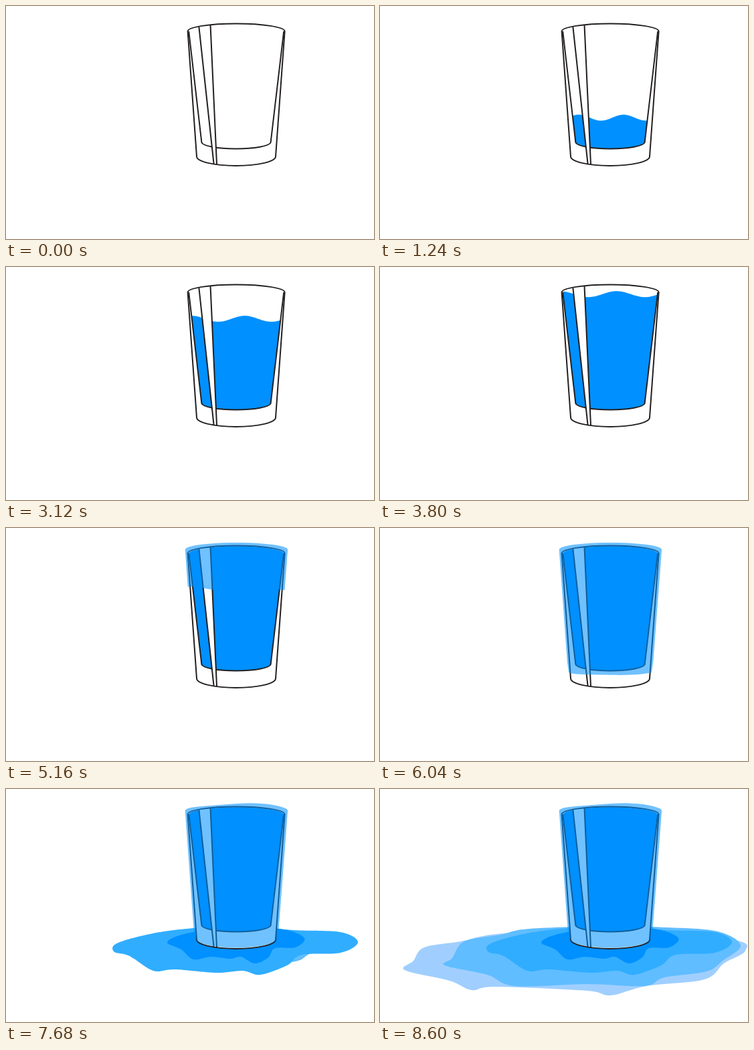
An HTML page with a canvas that plays this animation: 550x350 px, repeating every 9.28 s.

```html
<!DOCTYPE html>
<html lang="en">
<head>
<meta charset="utf-8">
<title>Overflowing glass</title>
<style>
  html, body { margin: 0; width: 100%; height: 100%; overflow: hidden; background: #fff; }
  canvas { display: block; width: 550px; height: 350px; }
</style>
</head>
<body>
<canvas id="stage"></canvas>
<script>
const LOOP = 9280, STEP = 40, END = 8600;
const BLUE = '#0090ff', INK = '#231f20';
const canvas = document.getElementById('stage');
const ctx = canvas.getContext('2d');
const ratio = window.devicePixelRatio || 1;
canvas.width = 550 * ratio;
canvas.height = 350 * ratio;
ctx.scale(ratio, ratio);

const { PI, sin, cos, min, max } = Math;
const progress = (t, from, to) => max(0, min(1, (t - from) / (to - from)));

function fill(path, color) {
  ctx.fillStyle = color;
  ctx.fill(path);
}

function polygon(points) {
  const path = new Path2D();
  points.forEach(p => path.lineTo(...p));
  path.closePath();
  return path;
}

// Closed Catmull-Rom curve
function blob(points) {
  const path = new Path2D(), n = points.length;
  path.moveTo(...points[0]);
  points.forEach((b, i) => {
    const a = points[(i + n - 1) % n], c = points[(i + 1) % n], d = points[(i + 2) % n];
    path.bezierCurveTo(
      b[0] + (c[0] - a[0]) / 6, b[1] + (c[1] - a[1]) / 6,
      c[0] - (d[0] - b[0]) / 6, c[1] - (d[1] - b[1]) / 6, c[0], c[1]);
  });
  return path;
}

// Glass
const outer = new Path2D('M271.6 38A72.5 11.5 0 0 1 416.6 38L403 226A59 14 0 0 1 285 226Z');
const inner = new Path2D('M273.4 38A71 11.5 0 0 1 415 38L395.6 205A51.7 10 0 0 1 292.4 205Z');
const innerLine = new Path2D('M273.2 38L292.4 205A51.7 10 0 0 0 395.6 205L415.2 38');
const strip = new Path2D('M288.3 30.6L310.6 237.4L315 238L305.5 28.4Z');
const stripLine = new Path2D('M288.3 30.6L310.6 237.4M305.5 28.4L315 238');

// Puddles from back to front, each a few corners of its outline
const puddles = [
  { color: '#a0cfff', from: 8040, to: 8600, y: 240, corners: [
    [345, 208], [182, 217], [120, 229], [66, 238], [50, 258], [37, 272], [104, 288], [137, 302], [173, 297],
    [309, 303], [345, 310], [398, 296], [485, 286], [514, 262], [546, 243], [525, 226]] },
  { color: '#60bdff', from: 7520, to: 8140, y: 240, corners: [
    [345, 206], [223, 210], [180, 219], [126, 229], [108, 254], [97, 265], [160, 279], [202, 296], [310, 293],
    [395, 296], [425, 283], [488, 274], [512, 258], [539, 235], [505, 214], [430, 208]] },
  { color: '#30adff', from: 7120, to: 7640, y: 240, corners: [
    [345, 206], [243, 213], [170, 230], [161, 244], [185, 251], [220, 273], [252, 271], [315, 276], [354, 273],
    [380, 279], [420, 265], [442, 249], [500, 246], [526, 230], [500, 215], [430, 212]] },
  { color: BLUE, from: 6280, to: 7280, y: 225, corners: [
    [345, 206], [270, 217], [241, 230], [262, 241], [280, 256], [306, 252], [335, 255], [351, 252], [372, 262],
    [392, 253], [402, 239], [432, 238], [446, 224], [415, 211]] }
];

function drawPuddle(p, t) {
  if (t < p.from) return;
  const s = .5 + progress(t, p.from, p.to) / 2, sy = s ** 1.3;
  fill(blob(p.corners.map(([x, y]) => [345 + (x - 345) * s, p.y + (y - p.y) * sy])), p.color);
}

// The level rises ever faster while a wave drifts left across it
function drawWater(t) {
  const level = 217 - .0365 * t - 2.6e-6 * t * t;
  const left = 273.4 + (level - 38) * .114;
  const width = 141.6 - (level - 38) * .228;
  const dip = .43 - .000043 * t;
  const points = [[425, 225], [265, 225]];
  for (let x = 265; x <= 425; x += 2) {
    points.push([x, level + 4.5 * cos(2 * PI * ((x - left) / width - dip) / .6)]);
  }
  ctx.save();
  ctx.clip(inner);
  fill(polygon(points), BLUE);
  ctx.restore();
}

// Water sheet running down the outside, ending on the curve of the base
function drawSheet(t) {
  const d = t - 4240, N = 24;
  if (d <= 0) return;
  const drop = min(214.5, .0345 * d + 4.16e-5 * d * d);
  const k = drop / 214.5, settle = k ** 12;
  const tilt = 1.5 * progress(t, 6040, 7680);
  const leftAt = y => 267.8 + (y - 34) * .072;
  const rightAt = y => 421 - (y - 34) * .076;
  const top = [], edge = [];
  for (let i = 0; i <= N; i++) {
    const a = PI * i / N, u = (1 - cos(a)) / 2;
    const y = 32.5 - 10.5 * sin(a) + tilt * sin(2 * PI * u);
    const ripple = 4 * (1 - k) * sin(9 * u + t / 300);
    const low = max(y, 24 + drop - 12.5 * settle * (1 - sin(a)) + ripple);
    const place = (h, inset) => leftAt(h) + inset + (rightAt(h) - leftAt(h) - 2 * inset) * u;
    top.push([place(y, 0), y]);
    edge.push([place(low, 3 * settle), low]);
  }
  const side = (from, to, xAt) => {
    const y = max(from[1], to[1] - 16);
    return [xAt(y), y];
  };
  const right = side(top[N], edge[N], rightAt), left = side(top[0], edge[0], leftAt);
  ctx.globalAlpha = .56;
  fill(polygon([...top, right, ...edge.reverse(), left]), BLUE);
  ctx.globalAlpha = 1;
}

function draw(t) {
  ctx.fillStyle = '#fff';
  ctx.fillRect(0, 0, 550, 350);
  puddles.forEach(p => drawPuddle(p, t));
  fill(outer, '#fff');
  drawWater(t);
  ctx.strokeStyle = INK;
  ctx.lineWidth = 2;
  ctx.lineJoin = 'round';
  ctx.stroke(innerLine);
  fill(strip, '#fff');
  ctx.stroke(stripLine);
  ctx.stroke(outer);
  drawSheet(t);
}

const start = performance.now();
function tick() {
  const t = (performance.now() - start) % LOOP;
  draw(min(END, Math.floor(t / STEP) * STEP));
  requestAnimationFrame(tick);
}
tick();
</script>
</body>
</html>
```
